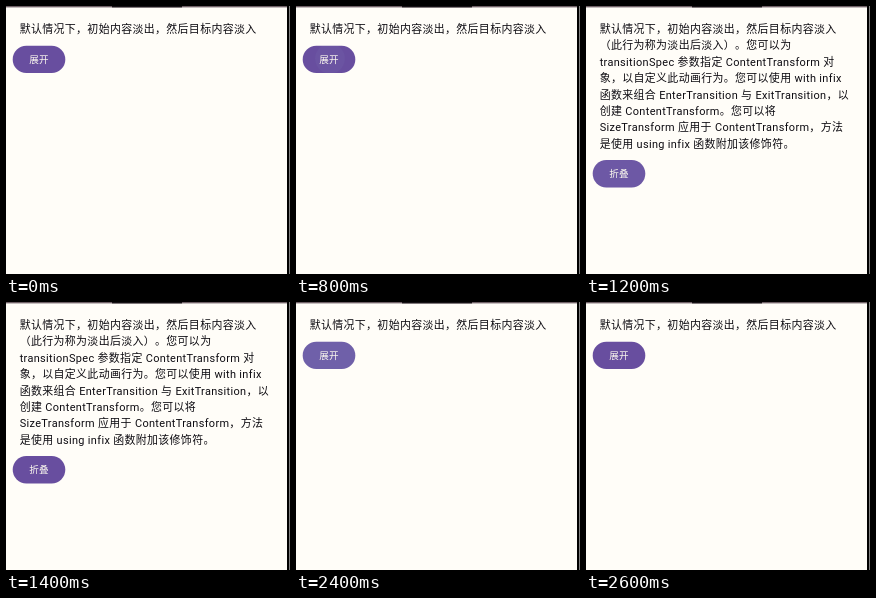
An HTML page with a canvas for the animation above (4.4 s loop, 284x268 px).

```html
<!DOCTYPE html>
<html lang="zh-CN">
<head>
<meta charset="utf-8">
<style>
  html, body { margin: 0; width: 100%; height: 100%; overflow: hidden; background: #fffdf8; }
  canvas { display: block; width: 284px; height: 268px; }
</style>
</head>
<body>
<canvas id="stage"></canvas>
<script>
const W = 284, H = 268, LOOP = 4400;
const LINE = 16.4, FIRST_BASELINE = 27;
const FONT = 'Roboto, "Noto Sans CJK SC", "Noto Sans CJK", sans-serif';
const LINES = [
  '默认情况下，初始内容淡出，然后目标内容淡入',
  '（此行为称为淡出后淡入）。您可以为',
  'transitionSpec 参数指定 ContentTransform 对',
  '象，以自定义此动画行为。您可以使用 with infix',
  '函数来组合 EnterTransition 与 ExitTransition，以',
  '创建 ContentTransform。您可以将',
  'SizeTransform 应用于 ContentTransform，方法',
  '是使用 using infix 函数附加该修饰符。'
];

// Stepped states: start time, expanded, ripple radius, ripple opacity
const STATES = [
  [0, false, 0, 0],
  [800, false, 15, 0.03],
  [1000, true, 40, 0.13],
  [1200, true, 40, 0.06],
  [1400, true, 0, 0],
  [2200, false, 15, 0.03],
  [2400, false, 40, 0.1],
  [2600, false, 0, 0]
];

const canvas = document.getElementById('stage');
const ctx = canvas.getContext('2d');
const dpr = window.devicePixelRatio || 1;
canvas.width = W * dpr;
canvas.height = H * dpr;
ctx.scale(dpr, dpr);

function rect(color, x, y, w, h) {
  ctx.fillStyle = color;
  ctx.fillRect(x, y, w, h);
}

function setType(font, color, spacing, align) {
  ctx.font = font + ' ' + FONT;
  ctx.letterSpacing = spacing + 'px';
  ctx.textAlign = align;
  ctx.fillStyle = color;
}

// Breaking after closing brackets keeps full-width punctuation untrimmed
function textLine(str, x, y) {
  for (const part of str.split(/(?<=）)/)) {
    ctx.fillText(part, x, y);
    x += ctx.measureText(part).width;
  }
}

function button(label, y, radius, alpha) {
  ctx.save();
  ctx.beginPath();
  ctx.roundRect(6.7, y, 52.6, 27.3, 13.65);
  ctx.fillStyle = '#684e9f';
  ctx.fill();
  if (alpha) {
    ctx.clip();
    ctx.beginPath();
    ctx.arc(34, y + 12.8, radius, 0, Math.PI * 2);
    ctx.fillStyle = `rgba(180, 255, 255, ${alpha})`;
    ctx.fill();
  }
  ctx.restore();
  setType('500 9.6px', '#fffdf0', 0.07, 'center');
  ctx.fillText(label, 33, y + 17.3);
}

function draw(now) {
  const t = now % LOOP;
  const [, expanded, radius, alpha] = STATES.filter(s => s[0] <= t).pop();

  rect('#fffdf8', 0, 0, W, H);
  rect('#6f6066', 0, 0, 281, 1.4);
  rect('#141014', 106, 0, 70, 1.4);
  rect('#000', 281, 0, 2, H);
  rect('#808080', 283, 0, 1, H);

  const shown = expanded ? LINES : LINES.slice(0, 1);
  setType('10.94px', '#0e0c12', 0.34, 'left');
  shown.forEach((line, i) => textLine(line, 13.7, FIRST_BASELINE + i * LINE));
  button(expanded ? '折叠' : '展开', expanded ? 154.1 : 39.8, radius, alpha);
}

let start;
function tick(now) {
  start ??= now;
  draw(now - start);
  requestAnimationFrame(tick);
}
draw(0);
requestAnimationFrame(tick);
</script>
</body>
</html>
```
